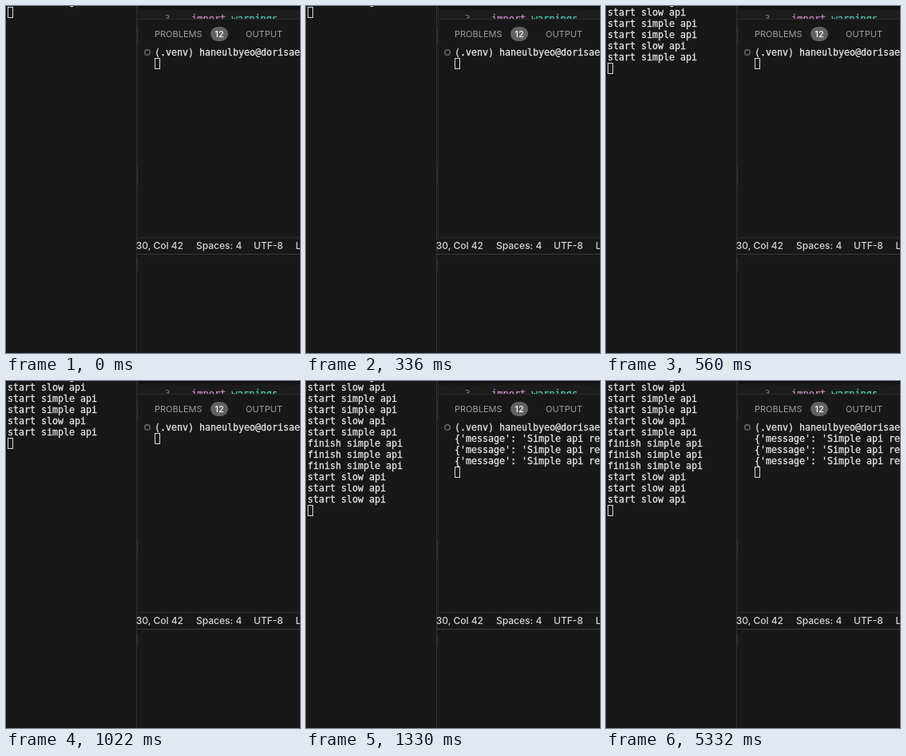
Recreate the animation shown at these times as an HTML page. Size 368 by 434 pixels, loop 8 s.

```html
<!DOCTYPE html>
<html lang="en">
<head>
<meta charset="utf-8">
<title>Terminals</title>
<style>
  html, body { margin: 0; width: 100%; height: 100%; overflow: hidden; background: #181818; }
  svg { display: block; width: 368px; height: 434px; }
  text { white-space: pre; }
  .mono { font-family: "DejaVu Sans Mono", monospace; font-size: 11.63px; fill: #e4e4e4; stroke: #e4e4e4; stroke-width: 0.3px; }
  .code { font-family: "DejaVu Sans Mono", monospace; font-size: 12px; }
  .ui { font-family: Inter, sans-serif; font-size: 11px; fill: #9d9d9d; }
  .status { font-size: 12px; font-weight: 500; fill: #d4d4d4; }
  .cursor { fill: none; stroke: #d8d8d8; }
</style>
</head>
<body>
<svg viewBox="0 0 368 434">
  <defs>
    <clipPath id="editorClip"><rect x="166" width="202" height="16"/></clipPath>
    <clipPath id="statusClip"><rect x="163" y="290" width="205" height="20"/></clipPath>
    <linearGradient id="shade" x2="0" y2="1">
      <stop stop-color="#0c0c0c"/>
      <stop offset="1" stop-color="#0c0c0c" stop-opacity="0"/>
    </linearGradient>
  </defs>
  <rect width="368" height="434" fill="#181818"/>

  <!-- editor strip -->
  <g class="code" clip-path="url(#editorClip)">
    <rect x="166" width="202" height="16" fill="#1c1c1c"/>
    <rect x="166" width="202" height="6" fill="url(#shade)"/>
    <text x="198.5" y="19.5" fill="#6e7681">3</text>
    <text x="232" y="19.5" fill="#c586c0" stroke="#c586c0" stroke-width="0.3">import</text>
    <text x="282.5" y="19.5" fill="#4ec9b0" stroke="#4ec9b0" stroke-width="0.3">warnings</text>
  </g>

  <!-- window edges -->
  <path d="M166 16.5H368M166 289.5H368" stroke="#2b2b2b"/>
  <path d="M164 310.5H368" stroke="#3a3a3a"/>
  <path d="M163.5 0V434" stroke="#303030"/>
  <path d="M165.5 0V310" stroke="#222222"/>
  <path d="M164.5 25V47M164.5 201V223M164.5 316V332" stroke="#303030"/>
  <path d="M165 315Q166 312 170 311.5" fill="none" stroke="#0e0e0e"/>

  <!-- panel tabs -->
  <g class="ui">
    <text x="186" y="39">PROBLEMS</text>
    <rect x="256" y="26" width="22" height="18" rx="9" fill="#616161"/>
    <text x="267" y="39" text-anchor="middle" fill="#f8f8f8" font-weight="500">12</text>
    <text x="300" y="39">OUTPUT</text>
  </g>
  <circle cx="177" cy="58" r="3.3" fill="none" stroke="#6b6b6b" stroke-width="1.4"/>

  <!-- status bar -->
  <g class="ui status" clip-path="url(#statusClip)">
    <text x="222" y="304" text-anchor="end">30, Col 42</text>
    <text x="238" y="304">Spaces: 4</text>
    <text x="310" y="304">UTF-8</text>
    <text x="362.5" y="304">LF</text>
  </g>

  <text class="mono" x="79" y="-2">g</text>
  <g id="server"></g>
  <g id="client"></g>
</svg>
<script>
const LOOP = 8000, FIRST = 560, SECOND = 1330, LINE = 14;
const SVG = "http://www.w3.org/2000/svg";

function add(parent, tag, attrs, text = "") {
  const node = document.createElementNS(SVG, tag);
  for (const key in attrs) node.setAttribute(key, attrs[key]);
  node.textContent = text;
  return parent.appendChild(node);
}

// Each line is [time it appears, text].
function terminal(id, x, baseline, lines) {
  const group = document.getElementById(id);
  const rows = lines.map(([at, text], i) => ({
    at, node: add(group, "text", { class: "mono", x, y: baseline + i * LINE }, text)
  }));
  const cursor = add(group, "rect", { class: "cursor", x: x + 0.5, width: 6, height: 13 });
  return time => {
    const shown = rows.filter(row => row.at <= time).length;
    rows.forEach((row, i) => row.node.setAttribute("visibility", i < shown ? "visible" : "hidden"));
    cursor.setAttribute("y", baseline + shown * LINE - 10.5);
  };
}

const at = (time, ...texts) => texts.map(text => [time, text]);
const slow = "start slow api", simple = "start simple api", done = "finish simple api";
const message = "{'message': 'Simple api response'}";

const terminals = [
  terminal("server", 2, 12, [
    ...at(FIRST, slow, simple, simple, slow, simple),
    ...at(SECOND, done, done, done, slow, slow, slow)
  ]),
  terminal("client", 186, 62, [
    ...at(0, "(.venv) haneulbyeo@dorisae"),
    ...at(SECOND, message, message, message)
  ])
];

const start = performance.now();
function draw() {
  const time = (performance.now() - start) % LOOP;
  terminals.forEach(update => update(time));
  requestAnimationFrame(draw);
}
draw();
</script>
</body>
</html>
```
